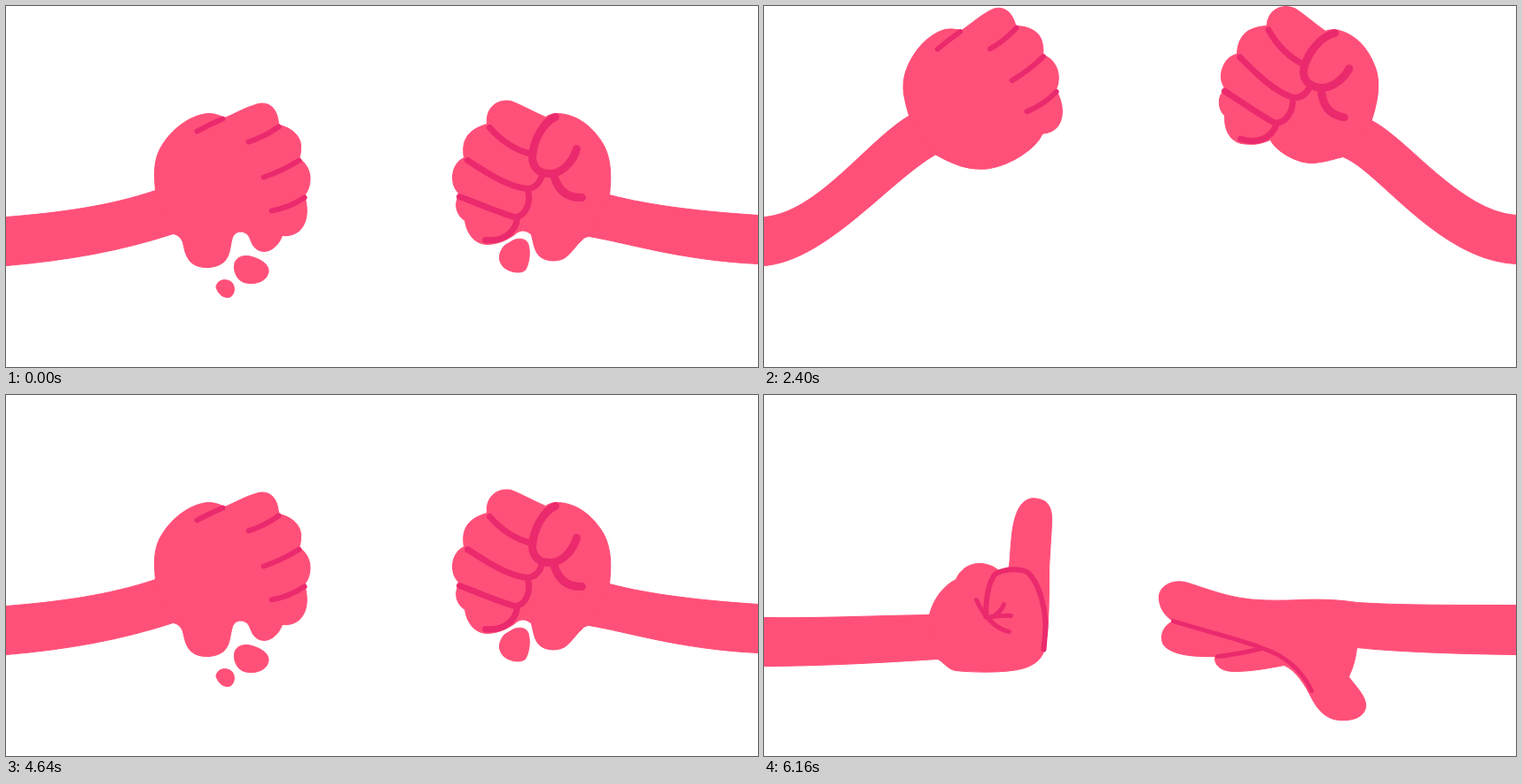
An HTML page that plays this animation: 848x408 px, repeating every 6.96 s.

```html
<!DOCTYPE html>
<html lang="en">
<head>
<meta charset="utf-8">
<title>Rock paper scissors</title>
<style>
  html, body { margin: 0; width: 100%; height: 100%; overflow: hidden; background: #fff; }
  svg { display: block; width: 100%; height: 100%; }
  .skin { fill: #ff5079; stroke: #ff5079; stroke-width: 1; stroke-linejoin: round; }
  .crease { fill: none; stroke: #ea2a6d; stroke-linecap: round; stroke-linejoin: round; }
</style>
</head>
<body>
<svg viewBox="0 0 848 408"><g id="stage" transform="translate(.5 .5)"></g></svg>
<script>
const LOOP = 6960;
const ROUND = 2320;
const CYCLE = 560;

// arm: edge top, control, control, wrist top, wrist bottom, control, control, edge bottom
const leftUpArm = [[0, 238], [60, 233], [115, 226], [168, 208], [188, 257], [130, 276], [70, 287], [0, 293]];
const rightUpArm = [[848, 236], [785, 232], [725, 225], [680, 213], [657, 260], [700, 267], [760, 287], [848, 291]];
const leftUpTop = 'M168 208C166 185 166 170 178 153C190 136 208 123 227 121C235 121 240 123 246 126C258 121 270 114 281 111C295 106 306 114 307 134C322 137 333 147 332 160C332 166 331 169 330 172C340 178 344 190 342 200C341 207 338 211 336 214C340 226 340 240 334 249C329 257 320 260 311 259';
const rightUpTop = 'M680 213C682 195 683 172 672 154C660 135 643 122 622 121C617 121 612 122 608 125C596 120 580 111 569 107C552 104 540 116 542 133C524 138 512 148 516 171C503 177 500 195 506 206L511 213C504 222 507 236 517 242C519 256 527 268 541 269C555 269 566 263 573 258';
const leftUpLines = [[6, 'M215 141Q230 133 244 127M273 153Q290 148 307 136M290 193Q311 186 330 174M299 231Q320 227 336 216']];
const rightUpLines = [
  [9, 'M619 125C605 131 594 152 593 170C593 183 602 190 615 189C630 187 640 172 643 161M617 190C621 205 630 217 649 216'],
  [7, 'M545 137C558 152 572 162 592 167M520 174C540 187 565 204 588 206C598 205 602 198 604 190M511 215C530 222 555 233 573 238C585 238 592 222 588 208M540 264C556 266 575 258 576 238']
];

const left = {
  rising: {
    arm: leftUpArm, lines: leftUpLines,
    skin: leftUpTop + 'C308 268 300 277 290 277C279 276 277 268 274 261C270 253 259 252 255 261C252 270 253 280 246 288C238 296 222 297 212 292C202 286 201 275 199 267C197 261 193 258 188 257Z',
    drops: 'M257 292C258 283 268 280 277 283C288 286 298 293 295 302C292 312 278 315 268 312C260 309 256 300 257 292ZM238 313C241 308 250 308 254 312C258 316 258 324 253 328C247 331 240 326 238 321C236 318 236 316 238 313Z'
  },
  calm: {
    arm: leftUpArm, lines: leftUpLines,
    skin: leftUpTop + 'C300 274 270 286 245 285C222 284 205 272 188 257Z'
  },
  low: {
    arm: [[0, 239], [85, 237], [125, 247], [190, 262], [174, 315], [135, 306], [95, 291], [0, 291]],
    skin: 'M190 262C200 261 205 258 210 253C216 246 220 237 223 230C229 216 240 209 254 211C268 213 274 222 274 230C276 240 286 249 300 252C325 245 351 262 352 284C352 294 349 300 345 305C356 320 350 343 334 348C337 363 328 381 309 382C307 394 300 404 289 404C280 403 273 400 267 398C254 392 239 383 225 375C204 363 184 351 178 333C175 326 174 321 174 315Z',
    drops: 'M287 219C291 212 303 211 308 219C312 226 313 235 309 241C303 243 296 241 292 235C287 231 284 225 287 219Z',
    lines: [[6, 'M267 241C273 248 284 252 296 254M305 294C317 301 330 305 342 305M289 336C303 343 318 347 333 349M271 369C283 377 295 381 307 383']]
  },
  finger: {
    arm: [[0, 251], [60, 252], [120, 249], [186, 248], [195, 298], [135, 302], [60, 306], [0, 306]],
    skin: 'M186 248C190 232 200 216 216 208C221 196 232 189 245 190C254 191 260 194 264 198C269 196 273 195 276 194C278 172 278 150 284 134C289 120 298 114 309 117C320 119 325 127 324 145L321 195C321 225 321 260 317 282C315 296 306 305 290 309C270 314 235 313 215 311C206 309 201 300 195 298Z',
    lines: [
      [6, 'M250 250C249 235 252 212 260 202C270 196 288 195 297 200C310 212 317 240 317 262L315 287'],
      [5, 'M239 231C244 242 250 251 257 257C263 262 269 266 276 267M253 253C262 248 268 243 270 236M255 250C264 250 270 248 278 249']
    ]
  }
};

const right = {
  rising: {
    arm: rightUpArm, lines: rightUpLines,
    skin: rightUpTop + 'C580 251 587 253 592 258C594 266 595 275 600 281C607 289 622 289 630 284C638 278 642 270 650 263C653 260 657 260 657 260Z',
    drops: 'M572 264C580 261 588 263 589 271C591 280 589 292 585 298C579 303 566 300 560 294C553 286 556 276 562 270Z'
  },
  calm: {
    arm: rightUpArm, lines: rightUpLines,
    skin: rightUpTop + 'C580 268 605 278 625 274C640 270 650 263 657 260Z'
  },
  low: {
    arm: [[848, 242], [790, 245], [720, 258], [655, 273], [674, 319], [730, 311], [790, 300], [848, 298]],
    skin: 'M655 273C650 262 640 249 627 242C616 237 605 238 597 234C591 225 580 221 570 222C558 225 552 235 553 245C551 252 545 257 539 259C525 252 505 253 497 263C488 275 489 290 501 299C489 305 486 322 494 333C498 339 501 342 505 343C499 352 502 368 511 374C516 378 520 379 525 379C525 393 535 403 548 405C566 406 585 396 602 388C621 381 641 373 653 357C663 343 662 333 666 326C668 322 671 320 674 319Z',
    lines: [
      [8.5, 'M552 249C549 275 562 300 577 302C592 303 601 285 596 258M597 293C605 304 622 308 633 296'],
      [6.5, 'M502 301C522 302 545 300 562 294M506 344C535 344 560 339 580 334C587 326 588 315 584 305M526 381C550 380 575 373 592 364C598 356 596 342 588 334M593 364C602 370 606 378 602 385']
    ]
  },
  scissors: {
    arm: [[848, 248], [780, 246], [700, 246], [638, 238], [640, 290], [700, 299], [780, 299], [848, 303]],
    skin: 'M638 238C631 222 615 205 603 199C590 197 570 201 556 202C551 205 549 209 549 211C535 207 515 204 504 203C485 197 460 191 445 191C432 193 426 205 430 213C434 222 445 226 455 229C470 234 490 240 506 243C490 245 465 250 444 250C428 250 419 260 420 270C423 284 440 287 460 286L497 281C490 288 490 303 494 310C497 317 500 321 506 325C505 337 514 347 530 349C547 350 560 344 569 338C585 335 605 329 618 320C630 311 638 300 640 290Z',
    lines: [[4.5, 'M553 207C547 220 550 240 559 254C566 260 574 259 579 253C585 243 583 230 578 222M579 236C584 232 589 229 593 225M580 259C592 268 612 274 626 261M526 233C522 248 522 265 524 280M499 283C503 281 512 281 516 287C535 282 555 277 566 279C577 285 577 298 567 308C553 319 530 329 507 324M567 308C578 313 578 325 571 335']]
  },
  paper: {
    arm: [[848, 237], [780, 237], [710, 237], [668, 234], [668, 285], [715, 290], [780, 292], [848, 293]],
    skin: 'M668 234C650 231 625 230 605 231C585 232 560 232 545 230C520 227 500 219 478 212C462 207 447 214 445 226C444 239 452 250 461 255C450 260 446 270 449 280C455 292 480 296 508 295C507 305 515 312 530 312C550 312 570 308 586 305C600 311 610 328 617 342C624 356 634 366 648 367C664 368 675 364 678 353C680 341 666 328 659 318C664 307 667 296 668 285Z',
    lines: [[5, 'M461 255C485 263 530 274 560 285C590 295 607 312 617 334M511 295C530 293 545 290 560 286']]
  }
};

// One shake; turn is positive when the fist tips down.
const shake = [
  { at: 0, hand: 'rising', drops: true },
  { at: 80, hand: 'calm', dy: -87, turn: -12 },
  { at: 160, hand: 'calm', dy: -70, turn: -8 },
  { at: 240, hand: 'calm', dy: -45, turn: 4 },
  { at: 320, hand: 'low', drops: true },
  { at: 360, hand: 'low', dy: 3 },
  { at: 440, hand: 'low', dy: -8 },
  { at: 520, hand: 'calm', dy: 40, turn: 10 }
];

const rounds = [
  { throwAt: 1480, sink: 9, hand: 'scissors' },
  { throwAt: 1440, sink: 8, hand: 'low', dy: -32, turn: -9 },
  { throwAt: 1440, sink: 6, hand: 'paper' }
];

const stage = document.getElementById('stage');

function add(parent, tag, cls) {
  const el = document.createElementNS('http://www.w3.org/2000/svg', tag);
  if (cls) el.setAttribute('class', cls);
  return parent.appendChild(el);
}

function makeSide(hands, sign) {
  const arm = add(stage, 'path', 'skin');
  const group = add(stage, 'g');
  const skin = add(group, 'path', 'skin');
  const creases = [add(group, 'path', 'crease'), add(group, 'path', 'crease')];
  return { hands, sign, arm, group, skin, creases };
}

const sides = [makeSide(left, 1), makeSide(right, -1)];

function drawSide(side, { hand, dy = 0, turn = 0, drops = false }) {
  const shape = side.hands[hand];
  const [e1, c1, c2, w1, w2, c3, c4, e2] = shape.arm;
  const px = (w1[0] + w2[0]) / 2, py = (w1[1] + w2[1]) / 2;
  const angle = turn * side.sign;
  const cos = Math.cos(angle * Math.PI / 180), sin = Math.sin(angle * Math.PI / 180);
  const move = ([x, y]) => [
    px + (x - px) * cos - (y - py) * sin,
    py + (x - px) * sin + (y - py) * cos + dy
  ];
  // The arm runs a little way into the hand so that no seam shows.
  const inside = move([px + 25 * side.sign, py]);
  side.arm.setAttribute('d',
    `M${e1}C${c1} ${move(c2)} ${move(w1)}L${inside}L${move(w2)}C${move(c3)} ${c4} ${e2}Z`);
  side.group.setAttribute('transform', `translate(0 ${dy}) rotate(${angle} ${px} ${py})`);
  side.skin.setAttribute('d', shape.skin + (drops ? shape.drops || '' : ''));
  side.creases.forEach((el, i) => {
    const [width, d] = shape.lines[i] || [0, ''];
    el.setAttribute('d', d);
    el.setAttribute('stroke-width', width);
  });
}

function draw(time) {
  const t = time % LOOP;
  const round = rounds[Math.floor(t / ROUND)];
  const local = t % ROUND;
  if (local < round.throwAt) {
    const pose = shake.findLast(p => p.at <= local % CYCLE);
    sides.forEach(side => drawSide(side, pose));
  } else {
    const sink = local < 1520 ? round.sink : 0;
    drawSide(sides[0], { hand: 'finger', dy: sink });
    drawSide(sides[1], { ...round, dy: (round.dy || 0) + sink });
  }
}

const start = performance.now();
function tick() {
  draw(performance.now() - start);
  requestAnimationFrame(tick);
}
tick();
</script>
</body>
</html>
```
